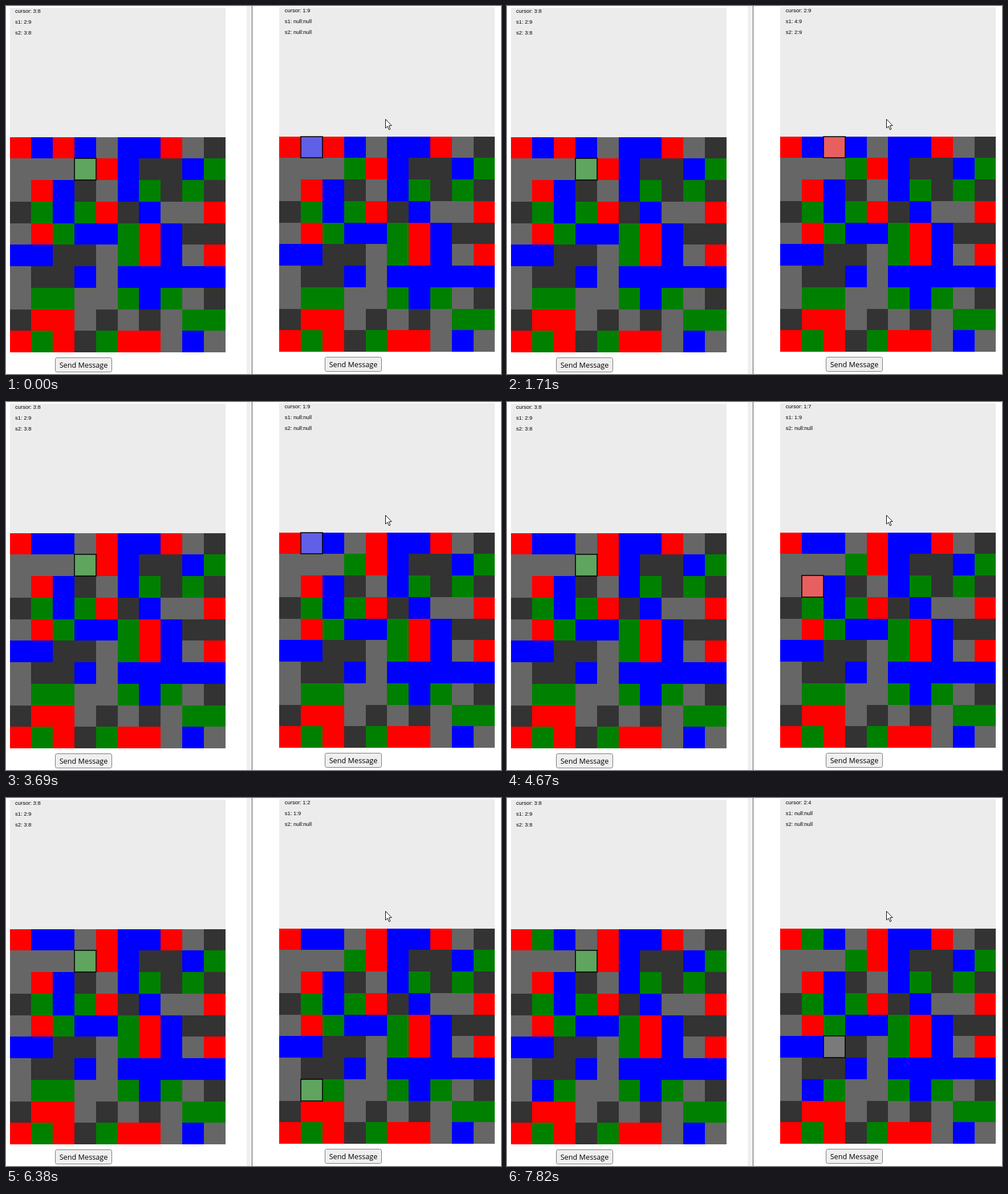
An HTML page with a canvas that plays this animation: 868 px wide and 645 px high, repeating every 8 s.

```html
<!DOCTYPE html>
<html lang="en">
<head>
<meta charset="utf-8">
<title>Tile swap</title>
<style>
  html, body { margin: 0; width: 100%; height: 100%; overflow: hidden; background: #fff; }
  canvas { display: block; }
</style>
</head>
<body>
<canvas id="stage" width="868" height="645"></canvas>
<script>
const ctx = document.getElementById('stage').getContext('2d');
const LOOP = 8000, SIZE = 10, CELL_W = 37.8, CELL_H = 37.75;
const COLORS = { R: '#f00', G: '#008000', B: '#00f', m: '#666', d: '#333' };
const START = [
  'RBRBmBBRmd', 'mmmGRBddBG', 'mRBdmBGdGd', 'dGBGRdBmmR', 'mRGBBGRBdd',
  'BBddmGRBmR', 'mddBmBBBBB', 'mGGmmGBGmd', 'dRRmdmdmGG', 'RGRdGRRmBm'
];
const LEFT = { x: 6.6, top: 2.6, grid: 229.55, textY: 12 };
const RIGHT = { x: 479.4, top: 1.6, grid: 228.55, textY: 11 };
const NONE = 'null:null';

// [time, action]: a position moves the cursor, "pick" selects, "swap" exchanges
const STEPS = [
  [120, '2:9'], [240, '3:9'], [610, '4:9'], [850, 'pick'],
  [1220, '3:9'], [1340, '2:9'], [1710, 'pick'], [1950, 'swap'],
  [2450, '3:9'], [2570, 'pick'], [2820, '2:9'], [3080, 'pick'], [3450, 'swap'],
  [3690, '1:9'], [4060, 'pick'], [4300, '1:8'], [4670, '1:7'], [4790, '1:6'],
  [4910, '1:5'], [5150, '0:5'], [5270, '0:4'], [5510, '0:3'], [5880, '0:2'],
  [6380, '1:2'], [6620, 'pick'], [7000, 'swap'],
  [7460, '2:2'], [7700, '2:3'], [7820, '2:4']
];

// Rows count upwards from the bottom.
function locate(pos) {
  const [col, up] = pos.split(':').map(Number);
  return [SIZE - 1 - up, col];
}

function stateAt(time) {
  const s = { grid: START.map(row => [...row]), cursor: '1:9', s1: NONE, s2: NONE };
  for (const [at, action] of STEPS) {
    if (at > time) break;
    if (action === 'pick') {
      s[s.s1 === NONE ? 's1' : 's2'] = s.cursor;
    } else if (action === 'swap') {
      const [r1, c1] = locate(s.s1), [r2, c2] = locate(s.s2);
      [s.grid[r1][c1], s.grid[r2][c2]] = [s.grid[r2][c2], s.grid[r1][c1]];
      s.s1 = s.s2 = NONE;
    } else {
      s.cursor = action;
    }
  }
  return s;
}

function box(x1, y1, x2, y2, color) {
  ctx.fillStyle = color;
  ctx.fillRect(x1, y1, x2 - x1, y2 - y1);
}

function drawButton(x, y) {
  ctx.beginPath();
  ctx.roundRect(x + 0.5, y + 0.5, 99, 25, 3);
  ctx.fillStyle = '#efefef';
  ctx.fill();
  ctx.strokeStyle = '#767676';
  ctx.lineWidth = 1;
  ctx.stroke();
  ctx.fillStyle = '#000';
  ctx.font = '12.7px "Open Sans", "Noto Sans", sans-serif';
  ctx.textAlign = 'center';
  ctx.fillText('Send Message', x + 50, y + 18);
}

function drawBoard(place, grid, cursor, s1, s2) {
  const edgeX = i => Math.round(place.x + i * CELL_W);
  const edgeY = i => Math.round(place.grid + i * CELL_H);
  const left = edgeX(0), right = edgeX(SIZE), top = Math.round(place.top);

  box(left, top, right, edgeY(0), '#ececec');
  grid.forEach((row, r) => row.forEach((key, c) =>
    box(edgeX(c), edgeY(r), edgeX(c + 1), edgeY(r + 1), COLORS[key])));

  const [r, c] = locate(cursor);
  const x = edgeX(c), y = edgeY(r), w = edgeX(c + 1) - x, h = edgeY(r + 1) - y;
  ctx.save();
  ctx.beginPath();
  ctx.rect(left, top, right - left, edgeY(SIZE) - top);
  ctx.clip();
  ctx.fillStyle = 'rgba(205,205,205,.463)';
  ctx.fillRect(x, y, w, h);
  ctx.strokeStyle = 'rgba(0,0,0,.8)';
  ctx.lineWidth = 2;
  ctx.strokeRect(x, y, w, h);
  ctx.restore();

  ctx.fillStyle = '#000';
  ctx.font = '9.45px "Liberation Sans", Arial, sans-serif';
  ctx.textAlign = 'left';
  ['cursor: ' + cursor, 's1: ' + s1, 's2: ' + s2].forEach((line, i) =>
    ctx.fillText(line, place.x + 9.45, place.textY + i * 18.9));

  drawButton(Math.round(place.x + 79.4), top + 613);
}

function drawDivider() {
  box(422, 0, 431, 645, '#f0f0f0');
  box(431, 0, 432, 645, '#555');
}

function drawPointer(x, y) {
  const points = [[0, 0], [0, 15.5], [3.5, 12.3], [6, 18.2], [8.4, 17.2], [5.9, 11.4], [10.6, 11]];
  ctx.beginPath();
  points.forEach(([dx, dy]) => ctx.lineTo(x + dx, y + dy));
  ctx.closePath();
  ctx.fillStyle = '#fff';
  ctx.fill();
  ctx.strokeStyle = '#000';
  ctx.lineWidth = 1;
  ctx.stroke();
}

function draw(time) {
  const s = stateAt(time);
  box(0, 0, 868, 645, '#fff');
  drawDivider();
  drawBoard(LEFT, s.grid, '3:8', '2:9', '3:8');
  drawBoard(RIGHT, s.grid, s.cursor, s.s1, s.s2);
  drawPointer(665.5, 198.5);
}

const begin = performance.now();
function tick() {
  draw((performance.now() - begin) % LOOP);
  requestAnimationFrame(tick);
}
tick();
</script>
</body>
</html>
```
